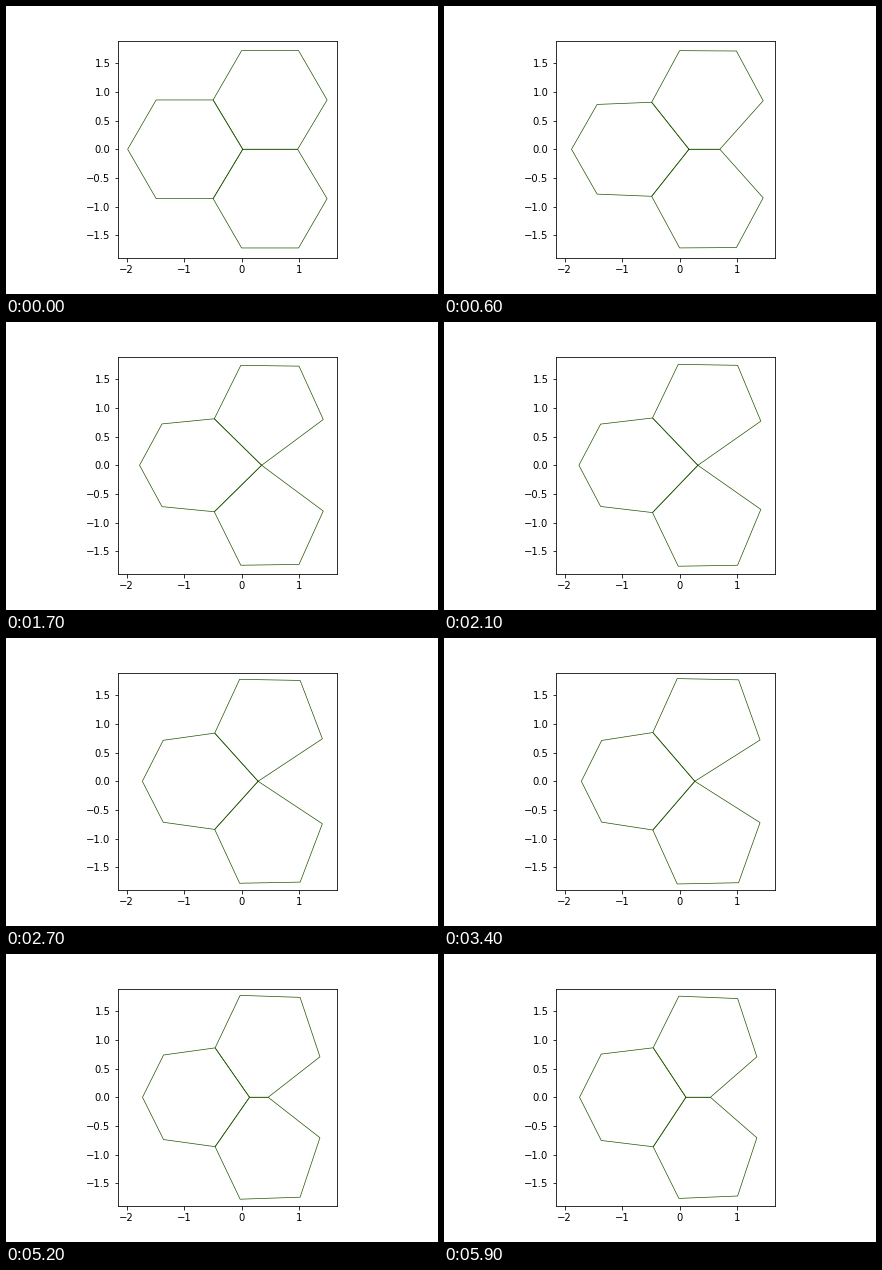
Recreate the animation shown at these times as a matplotlib script. Size 432 by 288 pixels, loop 6 s.

```python
import numpy as np
import matplotlib.pyplot as plt
from matplotlib.animation import FuncAnimation

FRAMES, INTERVAL = 60, 100
MERGE, SPLIT = 13, 45  # the two inner corners snap together, then apart
TIMES = [0, MERGE, SPLIT, FRAMES - 1]
RELAX = 13  # relaxation time of the corners, in frames
INK = "#225500"

# Honeycomb of three unit cells, as complex numbers, slightly relaxed.
W = np.exp(1j * np.pi / 3)
SHRINK = .992


def corner(start, merged, settled, end):
    return [start * SHRINK, merged, settled, end]


FAR = corner(-2, -1.81, -1.697, -1.742)
SHOULDER = corner(W**2, -.48 + .79j, -.464 + .857j, -.46 + .862j)
UPPER = corner(W**2 - 1, -1.4 + .725j, -1.351 + .709j, -1.364 + .752j)
TOP_LEFT = corner(2 * W**2 + 1, 1.717j, -.048 + 1.798j, -.013 + 1.761j)
TOP_RIGHT = corner(2 * W**2 + 2, .986 + 1.706j, 1.032 + 1.775j, 1.01 + 1.719j)
SIDE = corner(1 + W, 1.432 + .835j, 1.396 + .703j, 1.345 + .705j)

# The inner edge as (left, right) ends before and after each phase.
INNER = [((.02, .975), (.265, .505)),
         ((.39, .39), (.247, .247)),
         ((.185, .335), (.11, .536))]


def progress(t):
    """Phase index and its exponentially slowing progress from 0 to 1."""
    phase = int(t >= MERGE) + int(t >= SPLIT)
    start, end = TIMES[phase:phase + 2]
    return phase, np.expm1((start - t) / RELAX) / np.expm1((start - end) / RELAX)


def cells(t):
    phase, p = progress(t)

    def at(path):
        return path[phase] + (path[phase + 1] - path[phase]) * p

    before, after = np.array(INNER[phase])
    inner, right = before + (after - before) * p
    far, shoulder, upper = at(FAR), at(SHOULDER), at(UPPER)
    left = np.array([inner, shoulder, upper, far,
                     np.conj(upper), np.conj(shoulder), inner])
    top = np.array([inner, shoulder, at(TOP_LEFT), at(TOP_RIGHT),
                    at(SIDE), right, inner])
    return left, top, top.conj()


fig = plt.figure(figsize=(6, 4), dpi=72, facecolor="white")
fig.subplots_adjust(left=.125, right=.9, bottom=.125, top=.88)
ax = fig.add_subplot()
ax.set_aspect("equal")
ax.set_xlim(-2.159, 1.664)
ax.set_ylim(-1.893, 1.893)
ax.set_xticks(range(-2, 2))
ax.set_yticks(np.arange(-1.5, 1.6, .5))
outlines = [ax.plot([], [], color=INK, lw=.7)[0] for _ in range(3)]


def draw(i):
    for line, cell in zip(outlines, cells(i)):
        line.set_data(cell.real, cell.imag)
    return outlines


anim = FuncAnimation(fig, draw, frames=FRAMES, interval=INTERVAL, repeat=True)
plt.show()
```
